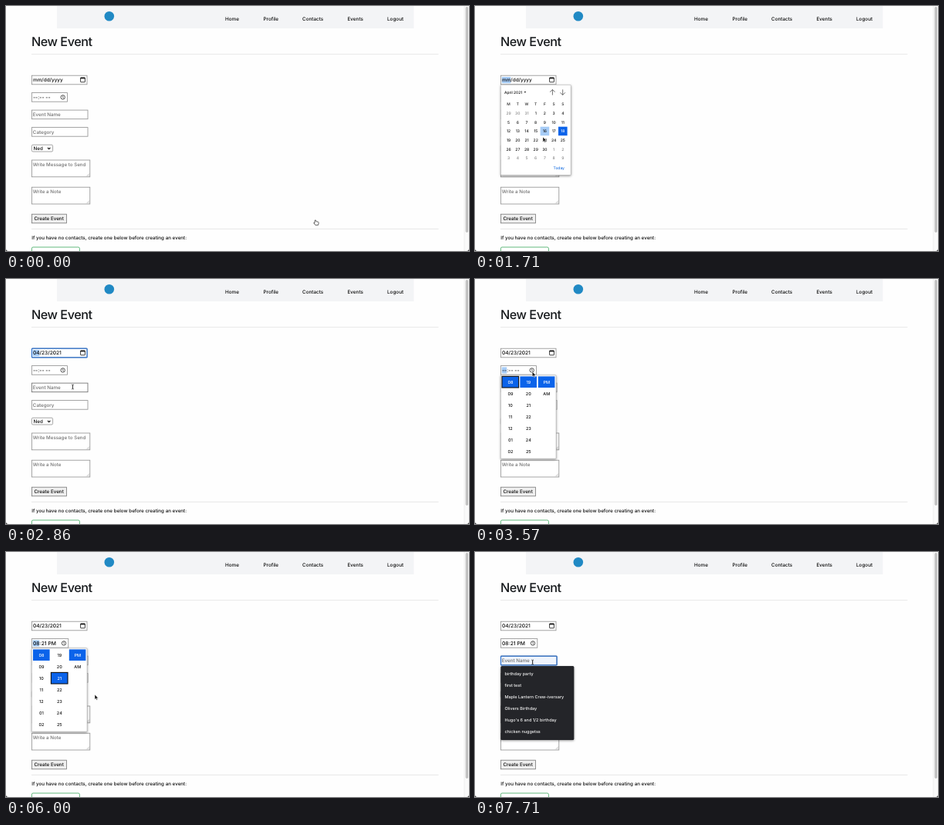
Recreate the animation shown at these times as an HTML page. Size 600x318 px, loop 8 s.

```html
<!DOCTYPE html>
<html lang="en">
<head>
<meta charset="utf-8">
<title>New Event</title>
<style>
  html, body { margin: 0; height: 100%; overflow: hidden; background: #fefefe; }
  svg { display: block; width: 100vw; height: 100vh; }
  text {
    font-family: Inter, "Open Sans", sans-serif; font-weight: 500;
    white-space: pre; text-rendering: geometricPrecision;
  }
  .popup { filter: drop-shadow(0 1px 1.5px rgba(0, 0, 0, .4)); }
</style>
</head>
<body>
<svg viewBox="0 0 600 318"><g id="page"></g><g id="live"></g></svg>
<script>
const LOOP = 8000, STEP = 1000 / 7;
const BLUE = '#0b63ea', PALE = '#a6ccf7', GREY = '#8e8e8e', HINT = '#707070', INK = '#0c0c0c';

const text = (x, y, s, size = 6.25, fill = INK, extra = '') =>
  `<text x="${x}" y="${y}" font-size="${size}" fill="${fill}" ${extra}>${s}</text>`;
const mid = (x, y, s, size, fill, weight = 500) =>
  text(x, y, s, size, fill, `text-anchor="middle" font-weight="${weight}"`);
const rect = (x, y, w, h, fill, extra = '') =>
  `<rect x="${x}" y="${y}" width="${w}" height="${h}" fill="${fill}" ${extra}/>`;
const path = (d, stroke, width = .7, extra = '') =>
  `<path d="${d}" fill="none" stroke="${stroke}" stroke-width="${width}" ${extra}/>`;
const field = (y, w, h = 11.6, stroke = GREY, fill = '#fff') =>
  rect(33.4, y, w, h, fill, `stroke="${stroke}" stroke-width=".8"`);
const ring = (y, w) =>
  rect(33.5, y, w, 11.8, 'none', 'rx="1" stroke="#2a70d0" stroke-width="1.2"');

function textarea(y, label) {
  return field(y, 75.4, 21.8) + text(34.8, y + 8.2, label, 6.2, HINT) +
    path(`M104.5 ${y + 21}l3.5-3.5M106.5 ${y + 21}l1.5-1.5`, '#888', .5);
}

function drawPage() {
  const nav = [[284, 'Home'], [333.5, 'Profile'], [384, 'Contacts'], [442.5, 'Events'], [494, 'Logout']];
  return rect(0, 0, 600, 318, '#fefefe') +
    rect(66, 0, 462.5, 29, '#f3f4f6') +
    '<circle cx="133.8" cy="13.3" r="6.3" fill="#2089c4"/>' +
    nav.map(([x, s]) => text(x, 18.7, s, 6.35)).join('') +
    text(33, 52, 'New Event', 16.2, '#16191c', 'letter-spacing="-.47"') +
    path('M33 62.6H560.5M33 289.4H560.5', '#e4e4e4', .8) +
    field(157.6, 72.6) + text(34.8, 165.8, 'Category', 6.25, HINT) +
    rect(33.4, 180.2, 27.2, 8.8, '#fff', `rx="1.5" stroke="${GREY}" stroke-width=".8"`) +
    text(35.6, 187, 'Ned', 6.2) + path('M54 183.8l1.7 1.8 1.7-1.8', INK, 1.1) +
    textarea(200, 'Write Message to Send') + textarea(235.2, 'Write a Note') +
    rect(33.4, 270.2, 45, 11.6, '#efefef', 'stroke="#777" stroke-width=".8"') +
    text(36.4, 278.3, 'Create Event') +
    text(33.2, 303.2, 'If you have no contacts, create one below before creating an event:') +
    rect(33.4, 313, 62, 16, '#fff', 'rx="1.8" stroke="#3aa75c" stroke-width=".8"') +
    rect(594, 0, 6, 318, '#fafafa') + path('M594 0V318', '#e6e6e6', .6) +
    rect(595.6, 1, 3.4, 293, '#c1c1c1', 'rx="1.7"') +
    '<path d="M0 318v-3q0 3 3 3zM600 318v-3q0 3-3 3z" fill="#222"/>';
}

function dateField(k) {
  const focused = k >= 8 && k < 24;
  const open = k >= 9 && k < 17;
  return field(90.2, 71.6) + (focused ? rect(34.8, 92, k < 16 ? 11.4 : 8.4, 8.2, PALE) : '') +
    text(35, 98.4, k < 16 ? 'mm/dd/yyyy' : '04/23/2021', k < 16 ? 6.4 : 6.6) +
    rect(96.6, 93, 5.8, 5.8, 'none', `rx=".5" stroke="${INK}" stroke-width=".8"`) +
    path('M96.6 93.6h5.8', INK, 1.4) +
    (focused && !open ? ring(90.1, 71.6) : '');
}

function timeField(k) {
  const set = k >= 37, w = set ? 47.4 : 46;
  const focused = k >= 24 && k < 45, open = k >= 25 && k < 43;
  const x = set ? 75 : 73.7;
  return field(112.6, w) + (focused ? rect(34.8, 114.4, set ? 8.4 : 6.4, 8.2, PALE) : '') +
    text(35, 120.8, set ? '08:21 PM' : '--:-- --', 6.75) +
    `<circle cx="${x}" cy="118.4" r="2.7" fill="none" stroke="${INK}" stroke-width=".7"/>` +
    path(`M${x} 116.6v2l1.2 .8`, INK, .6) +
    (focused && !open ? ring(112.5, w) : '');
}

function nameField(k) {
  const focused = k >= 51, hovered = k >= 20 && k < 22 || k >= 49;
  return field(135.1, 72.6, 11.6, hovered ? '#666' : GREY, k >= 53 ? '#eff4fc' : '#fff') +
    text(34.8, 143.3, 'Event Name', 6.25, HINT) +
    (focused ? ring(135.1, 72.6) : '') +
    (focused && k < 53 ? path('M34.9 137.4v7', INK, .5) : '');
}

const panel = (y, w, h) =>
  rect(33.3, y, w, h, '#fff', 'class="popup" rx="1" stroke="#aaa" stroke-width=".6"');

function calendar(k) {
  const hover = k < 11 ? 0 : k < 13 ? 16 : 23;
  const chosen = k < 16 ? 18 : 23;
  let out = panel(102.3, 91, 117.2) +
    text(38, 113.7, 'April 2021', 4.85, INK, 'font-weight="700"') +
    '<path d="M63.5 111h2.8l-1.4 1.7z" fill="#222"/>' +
    path('M100.4 115.6v-7M97.2 111.7l3.2-3.2 3.2 3.2M113.7 108.4v7M110.5 112.3l3.2 3.2 3.2-3.2', '#333', .7);
  [...'MTWTFSS'].forEach((d, i) => out += mid(43.6 + i * 11.7, 128.8, d, 4.9, '#222'));
  for (let i = 0; i < 42; i++) {
    const x = 43.6 + i % 7 * 11.7, y = 139 + Math.floor(i / 7) * 11.7;
    const n = i - 2, inMonth = n > 0 && n <= 30;
    const day = n < 1 ? n + 31 : inMonth ? n : n - 30;
    const on = inMonth && day === chosen;
    if (on || inMonth && day === hover) out += rect(x - 5.8, y - 5.7, 11.6, 11.5, on ? BLUE : PALE);
    out += mid(x, y + 1.8, day, 5, on ? '#fff' : inMonth ? '#111' : '#858585', on ? 700 : 500);
  }
  return out + text(101.6, 212.4, 'Today', 4.9, '#1a6fe0');
}

function clockPopup(k) {
  const chosen = k < 37 ? 0 : 2, active = k < 35 ? 0 : 1;
  const columns = [
    ['08', '09', '10', '11', '12', '01', '02'],
    [19, 20, 21, 22, 23, 24, 25],
    ['PM', 'AM']
  ];
  return panel(124.8, 71.8, 108.4) + columns.map((cells, c) => cells.map((s, r) => {
    const x = 35 + c * 23.4, y = 126.4 + r * 15;
    const on = r === (c === 1 ? chosen : 0);
    const hover = c === 1 && r === 2 && k >= 30 && k < 39;
    const edge = on && c === active ? 'stroke="#111" stroke-width="1.1"' : '';
    return (on || hover ? rect(x, y, 21.6, 14.6, on ? BLUE : PALE, edge) : '') +
      mid(x + 10.9, y + 9.5, s, 5.5, on ? '#fff' : '#111', on ? 700 : 500);
  }).join('')).join('');
}

function suggestions() {
  const items = ['birthday party', 'first test', 'Maple Lantern Crew-iversary',
    'Olivers Birthday', "Hugo's 6 and 1/2 birthday", 'chicken nuggetss'];
  return rect(33.3, 148, 95, 96, '#242529', 'class="popup" rx="1.5"') +
    items.map((s, i) => text(38.4, 160.4 + i * 15, s, 5.5, '#f3f3f3')).join('');
}

// Pointer route: step, x, y, shape (a shape lasts until the next one given)
const ROUTE = [
  [0, 402, 281, 'hand'], [1, 392, 272, 'arrow'], [3, 270, 170], [5, 140, 92], [6, 112, 82],
  [8, 99, 95], [9, 99, 95], [10, 97, 118], [11, 91, 152], [12, 88, 170], [13, 89, 172], [17, 89, 172],
  [18, 88, 162], [20, 86.5, 140, 'beam'], [21, 86, 138], [22, 82, 130, 'arrow'], [24, 74.2, 120.3],
  [26, 74.2, 120.3], [27, 80, 126], [28, 94, 140], [29, 80, 158], [30, 73, 165.4], [38, 73, 165.4],
  [39, 78, 170], [41, 105, 182], [43, 125, 188], [46, 118, 165], [47, 118, 165], [48, 98, 152],
  [49, 82, 145, 'beam'], [50, 74.6, 143], [56, 74.6, 143]
];
const SHAPES = {
  arrow: '<path d="M0 0v6.4l1.5-1.3 1 2.2 1.1-.5-1-2.1h2z" fill="#111" stroke="#fff" stroke-width=".5"/>',
  beam: path('M-1.4-3q1.4 0 1.4 1V2q0 1-1.4 1M1.4-3Q0-3 0-2V2Q0 3 1.4 3', '#222', .7),
  hand: '<path d="M-1.6-3q.8-.6 1.2.2l.5 1.6 2.3.4q1 .3.8 1.3l-.6 2.8h-3.8l-2-2.6q-.2-.9 1.3-.3z" fill="#fff" stroke="#222" stroke-width=".7"/>'
};

function pointer(k) {
  const i = ROUTE.findIndex(p => p[0] > k) - 1;
  const [k0, x0, y0] = ROUTE[i], [k1, x1, y1] = ROUTE[i + 1];
  const f = (k - k0) / (k1 - k0);
  const shape = ROUTE.slice(0, i + 1).reverse().find(p => p[3])[3];
  return `<g transform="translate(${x0 + (x1 - x0) * f} ${y0 + (y1 - y0) * f})">${SHAPES[shape]}</g>`;
}

function drawLive(k) {
  return dateField(k) + timeField(k) + nameField(k) +
    (k >= 9 && k < 17 ? calendar(k) : '') +
    (k >= 25 && k < 43 ? clockPopup(k) : '') +
    (k >= 51 ? suggestions() : '') + pointer(k);
}

const page = document.getElementById('page'), live = document.getElementById('live');
let shown = 0;
page.innerHTML = drawPage();
live.innerHTML = drawLive(0);

const start = performance.now();
function tick() {
  const t = (performance.now() - start) % LOOP;
  // Steps fall on times rounded to 10 ms, hence the small lead
  const k = Math.floor((t + 5) / STEP) % 56;
  if (k !== shown) live.innerHTML = drawLive(shown = k);
  requestAnimationFrame(tick);
}
requestAnimationFrame(tick);
</script>
</body>
</html>
```
